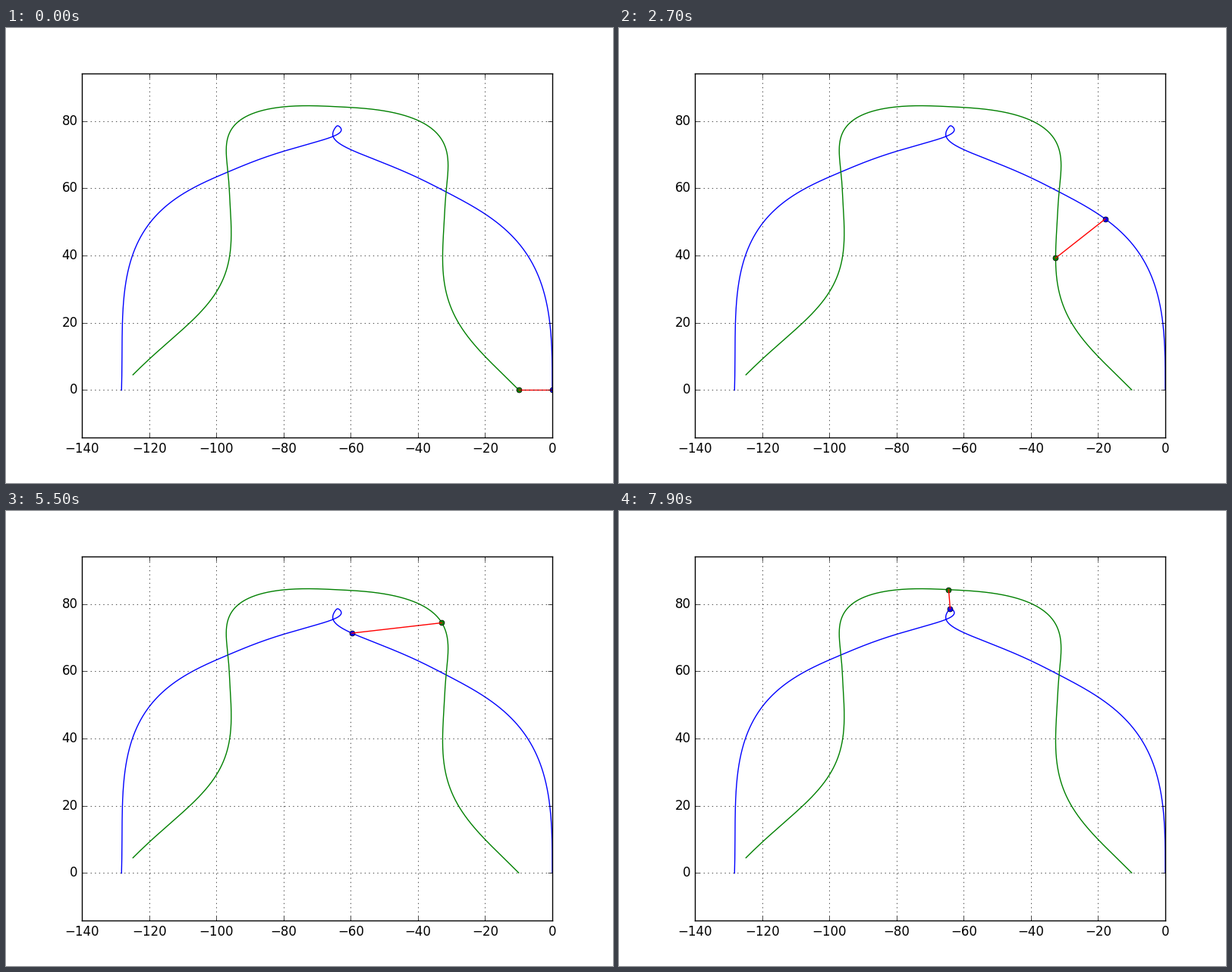
Recreate the animation shown at these times as a matplotlib script. Size 800 px wide and 600 px high, loop 8000 ms.

```python
import numpy as np
import matplotlib.pyplot as plt
from matplotlib.animation import FuncAnimation

# Two equal masses, joined by a spring, thrown under gravity.
G = 9.81
STIFFNESS = 2.0        # spring constant per mass
REST = 10.0            # spring length at rest
DT = 0.05              # seconds of flight per frame
SUB = 10               # integration steps per frame
FLIGHT = 8.1
FRAMES = 80

plt.rcParams.update({
    "font.family": "DejaVu Sans", "font.size": 12, "axes.linewidth": 1.0,
    "ytick.alignment": "center", "xtick.top": True, "ytick.right": True,
})
for axis in ("xtick", "ytick"):
    plt.rcParams.update({
        f"{axis}.direction": "in", f"{axis}.major.size": 4,
        f"{axis}.major.width": 0.5, f"{axis}.major.pad": 4,
    })


def rate(state):
    """Derivative of (blue, green, blue velocity, green velocity)."""
    blue, green, v_blue, v_green = state
    gap = green - blue
    dist = np.hypot(*gap)
    pull = STIFFNESS * (dist - REST) * gap / dist
    fall = np.array([0, -G])
    return np.array([v_blue, v_green, fall + pull, fall - pull])


def rk4(state, h):
    a = rate(state)
    b = rate(state + h / 2 * a)
    c = rate(state + h / 2 * b)
    d = rate(state + h * c)
    return state + h / 6 * (a + 2 * b + 2 * c + d)


states = [np.array([(0, 0), (-10, 0), (0, 50), (-30, 30)], float)]
for _ in range(round(FLIGHT / DT) * SUB):
    states.append(rk4(states[-1], DT / SUB))
states = np.array(states)
blue, green = states[:, 0], states[:, 1]

fig = plt.figure(figsize=(8, 6), dpi=100, facecolor="w")
ax = fig.add_axes([0.125, 0.1, 0.775, 0.8])
half = 70 * 480 / 620  # equal scale on both axes
ax.set(xlim=(-140, 0), ylim=(40 - half, 40 + half),
       xticks=range(-140, 1, 20), yticks=range(0, 81, 20))
ax.grid(True, color="k", lw=0.5, ls=(0, (2, 6)))
ax.set_axisbelow(False)

ax.plot(*blue.T, "b", lw=1)
ax.plot(*green.T, "g", lw=1)
blue_dot, green_dot = (
    ax.plot([], [], c + "o", ms=5, mec="k", mew=0.5)[0] for c in "bg")
link, = ax.plot([], [], "r", lw=1)


def update(i):
    b, g = blue[i * SUB], green[i * SUB]
    blue_dot.set_data(b[:1], b[1:])
    green_dot.set_data(g[:1], g[1:])
    link.set_data(*zip(b, g))
    return blue_dot, green_dot, link


anim = FuncAnimation(fig, update, frames=FRAMES, interval=100,
                     repeat=True, repeat_delay=0)
plt.show()
```
